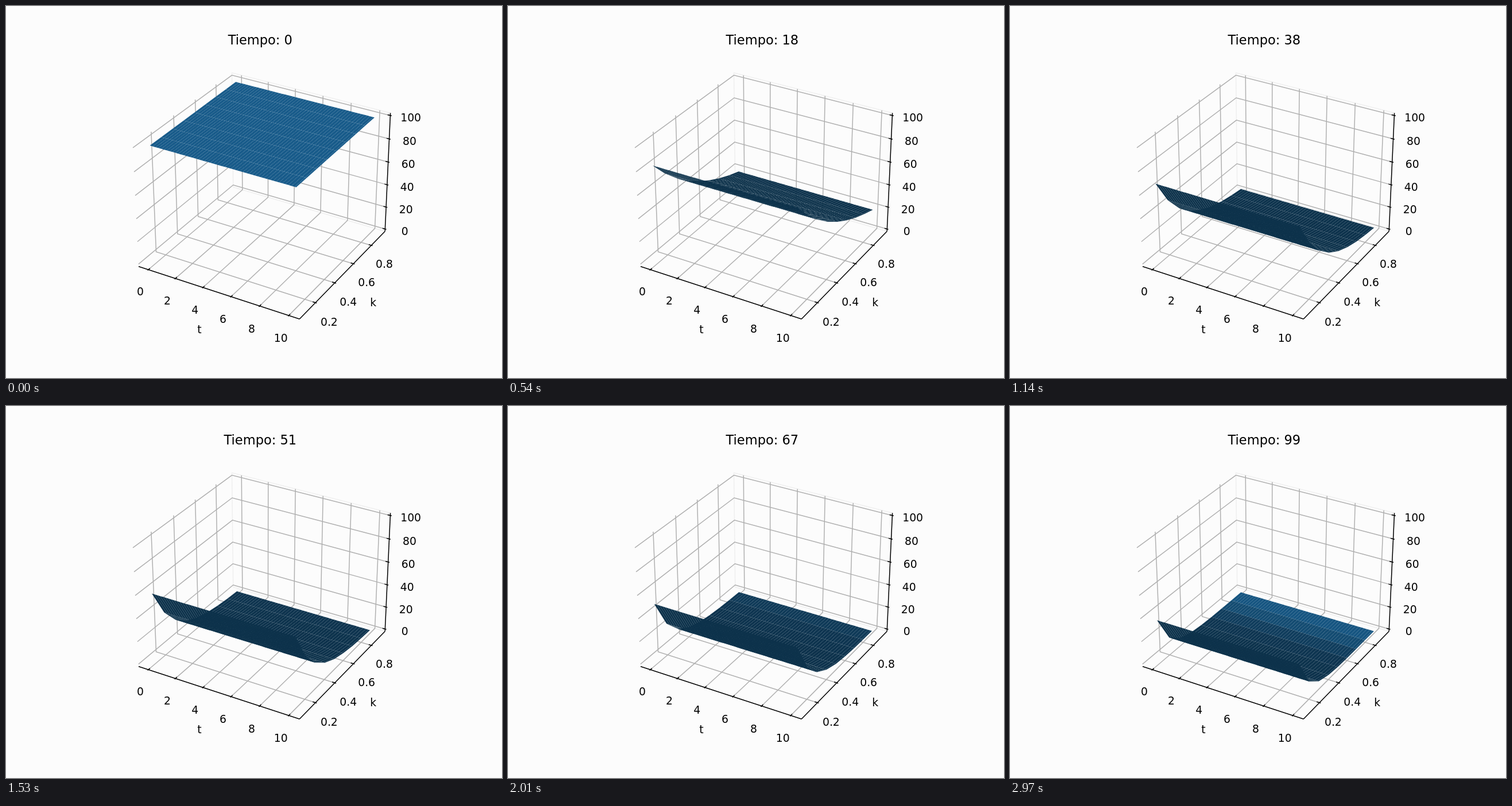
Animation of 864x648 px, one loop 3 s. Source, as an HTML page with a canvas:

```html
<!DOCTYPE html>
<html lang="es">
<head>
<meta charset="utf-8">
<style>
html, body { margin: 0; width: 100%; height: 100%; overflow: hidden; background: #fcfcfc; }
canvas { display: block; }
</style>
</head>
<body>
<canvas width="864" height="648"></canvas>
<script>
const ctx = document.querySelector('canvas').getContext('2d');
const SIDE = 8 / 7, FRAMES = 100, FRAME_MS = 30;
const SIN60 = Math.sqrt(3) / 2;

// Axis ranges: t, k and z, with the box drawn 1/48 beyond each end
const mid = [5, 0.5, 50], span = [11, 0.88, 100];
const lo = mid.map((m, i) => m - span[i] * 25 / 48);
const hi = mid.map((m, i) => m + span[i] * 25 / 48);
const step = span.map(s => s / 12);
const ticks = [[0, 2, 4, 6, 8, 10], [0.2, 0.4, 0.6, 0.8], [0, 20, 40, 60, 80, 100]];

// Perspective view: elevation 30, azimuth -60, distance 10
function project(t, k, z) {
  const x = (t - mid[0]) / span[0] * SIDE;
  const y = (k - mid[1]) / span[1] * SIDE;
  const h = (z - mid[2]) / span[2] * SIDE * 0.75;
  const w = 10 - (SIN60 / 2 * x - 0.75 * y + h / 2);
  const scale = 2697.08 / w;
  return [449.55 + scale * (SIN60 * x + y / 2),
          320.5 - scale * (-x / 4 + SIN60 / 2 * y + SIN60 * h), w];
}

function trace(points) {
  ctx.beginPath();
  for (const [x, y] of points) ctx.lineTo(x, y);
}

function line(color, width, ...points) {
  trace(points.map(p => project(...p)));
  ctx.strokeStyle = color;
  ctx.lineWidth = width;
  ctx.stroke();
}

function text(str, x, y, size = 18.75) {
  ctx.font = `${size}px "DejaVu Sans", sans-serif`;
  ctx.textAlign = 'center';
  ctx.fillStyle = '#000';
  ctx.fillText(str, x, y);
}

function label(str, point, drop) {
  const [x, y] = project(...point);
  text(str, x, y + drop);
}

function drawAxes() {
  const [t0, k0, z0] = lo, [t1, k1, z1] = hi, [dt, dk, dz] = step;
  line('#f5f5f5', 1.5, [t0, k0, z0], [t1, k0, z0], [t1, k1, z0]);
  line('#efefef', 1.5, [t0, k1, z0], [t0, k1, z1], [t1, k1, z1], [t1, k1, z0], [t0, k1, z0]);

  const grid = '#b0b0b0';
  for (const t of ticks[0]) line(grid, 1.5, [t, k0, z0], [t, k1, z0], [t, k1, z1]);
  for (const k of ticks[1]) line(grid, 1.5, [t1, k, z0], [t0, k, z0], [t0, k, z1]);
  for (const z of ticks[2]) line(grid, 1.5, [t0, k0, z], [t0, k1, z], [t1, k1, z]);

  line('#000', 1.5, [t0, k0, z0], [t1, k0, z0]);
  line('#000', 1.5, [t1, k0, z0], [t1, k1, z0]);
  line('#000', 1.5, [t1, k1, z0], [t1, k1, z1]);

  const pad = 1.037, drop = 15.2;
  for (const t of ticks[0]) {
    line('#000', 1.5, [t, k0 - 0.1 * dk, z0], [t, k0 + 0.2 * dk, z0]);
    label(t, [t, k0 - pad * dk, z0 - pad * dz], drop);
  }
  for (const k of ticks[1]) {
    line('#000', 1.5, [t1 + 0.1 * dt, k, z0], [t1 - 0.2 * dt, k, z0]);
    label(k, [t1 + pad * dt, k, z0 - pad * dz], drop);
  }
  for (const z of ticks[2]) {
    line('#000', 1.5, [t1 + 0.1 * dt, k1, z], [t1 - 0.2 * dt, k1, z]);
    label(z, [t1 + pad * dt, k1 + pad * dk, z], drop);
  }

  const far = 2.255;
  label('t', [mid[0], k0 - far * dk, z0 - far * dz], 5.5);
  label('k', [t1 + far * dt, mid[1], z0 - far * dz], 5.5);
}

// Light from azimuth 225, altitude 19.47; the slope is along k only
function shade(slope) {
  const dot = (2 * slope + 1) / 3 / Math.hypot(slope, 1);
  const f = 0.3 + 0.35 * (dot + 1);
  return `rgb(${[31, 119, 180].map(c => Math.round(c * f))})`;
}

function drawSurface(time) {
  const height = k => 100 * Math.exp(-k * time);
  const faces = [];
  for (let j = 1; j < 9; j++) {
    const ka = j / 10, kb = (j + 1) / 10;
    const za = height(ka), zb = height(kb);
    const color = shade((zb - za) / 0.1);
    for (let i = 0; i < 99; i += 2) {
      const ta = i * 10 / 99, tb = Math.min(i + 2, 99) * 10 / 99;
      const points = [project(ta, ka, za), project(tb, ka, za),
                      project(tb, kb, zb), project(ta, kb, zb)];
      faces.push({ points, color, depth: points.reduce((s, p) => s + p[2], 0) });
    }
  }
  faces.sort((a, b) => b.depth - a.depth);
  for (const { points, color } of faces) {
    trace(points);
    ctx.fillStyle = color;
    ctx.fill();
  }
}

function draw(now) {
  const n = Math.floor(now / FRAME_MS) % FRAMES;
  ctx.fillStyle = '#fcfcfc';
  ctx.fillRect(0, 0, 864, 648);
  drawAxes();
  drawSurface(n * 10 / 99);
  text('Tiempo: ' + n, 442.8, 66.5, 22.5);
}

function tick() {
  draw(performance.now());
  requestAnimationFrame(tick);
}
tick();
</script>
</body>
</html>
```
